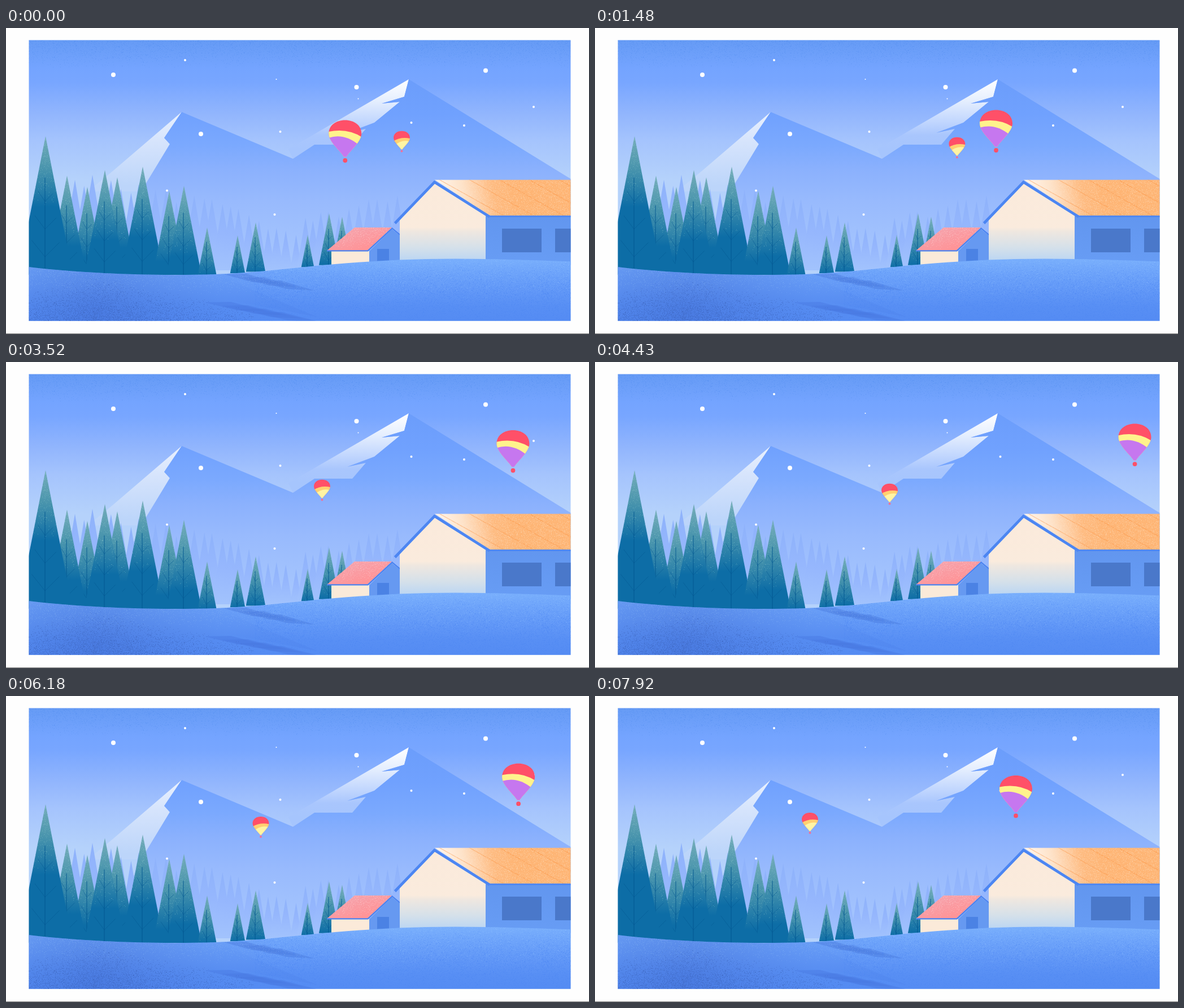
These frames come from a looping animation (1032 by 543 pixels, 8 s). An HTML page with a canvas:

```html
<!DOCTYPE html>
<html lang="en">
<head>
<meta charset="utf-8">
<title>Balloons over the valley</title>
<style>
html, body { margin: 0; width: 100%; height: 100%; overflow: hidden; background: #fefefe; }
canvas { display: block; }
</style>
</head>
<body>
<canvas id="stage" width="1032" height="543"></canvas>
<script>
const W = 1032, H = 543, LOOP = 8000;
const view = document.getElementById('stage').getContext('2d');
const backdrop = document.createElement('canvas');
backdrop.width = W;
backdrop.height = H;
const g = backdrop.getContext('2d');

let seed = 7;
const rnd = () => (seed = (seed * 16807) % 2147483647) / 2147483647;

// Stops are given as position, colour, position, colour ...
function grad(x0, y0, x1, y1, ...stops) {
  const fill = g.createLinearGradient(x0, y0, x1, y1);
  for (let i = 0; i < stops.length; i += 2) fill.addColorStop(stops[i], stops[i + 1]);
  return fill;
}
function glow(x, y, r, inner, outer) {
  const fill = g.createRadialGradient(x, y, 0, x, y, r);
  fill.addColorStop(0, inner);
  fill.addColorStop(1, outer);
  return fill;
}
function shape(d, fill) {
  const path = new Path2D(d);
  g.fillStyle = fill;
  g.fill(path);
  return path;
}
function line(d, color, width) {
  g.strokeStyle = color;
  g.lineWidth = width;
  g.stroke(new Path2D(d));
}
function dot(c, x, y, r, color) {
  c.fillStyle = color;
  c.beginPath();
  c.arc(x, y, r, 0, 7);
  c.fill();
}
// Grain inside a path; keep(u, v) is the chance of a speck at that spot.
function grain(path, x, y, w, h, count, color, keep = () => 1) {
  g.save();
  g.clip(path);
  g.fillStyle = color;
  for (let i = 0; i < count; i++) {
    const u = rnd(), v = rnd();
    if (rnd() < keep(u, v)) g.fillRect(Math.floor(x + u * w), Math.floor(y + v * h), 1, 1);
  }
  g.restore();
}
const fadeDown = (u, v) => 1 - v;

function sky() {
  const path = shape('M40 21H1000V520H40Z', grad(0, 22, 0, 270,
    0, '#669bf5', .2, '#74a4ff', .3, '#78a6ff', .52, '#91b5fd', .72, '#a5c4fd', 1, '#b5d2fb'));
  grain(path, 40, 22, 960, 50, 9000, 'rgba(70,130,235,.25)', fadeDown);
}

function mountains() {
  shape('M713 91L705 122L665 134L697 131L652 168L604 186L637 179L613 206H546L508 232L500 215Z',
    grad(0, 91, 0, 215, 0, '#fff', .3, '#e6effe', .6, '#c2d7fe', .8, '#a9c6fd', 1, '#a6c5fd'));
  shape('M311 149L280 195L290 206L240 290H145L190 253Z',
    grad(0, 149, 0, 280, 0, '#e9f1fe', .4, '#d6e4fc', 1, '#bcd5fa'));
  shape('M713 91L1000 268V430H170L250 272L290 206L280 195L311 149L508 232L546 207H613' +
    'L637 179L604 186L652 168L697 131L665 134L705 122Z',
    grad(0, 91, 0, 400, 0, '#6b9dfb', .2, '#70a1fe', .38, '#7ba9fe', .52, '#8bb1fd',
      .7, '#98bafd', 1, '#a5c5fd'));
}

// The far forest sinks towards the middle of the valley.
function backTrees() {
  for (let x = 122; x < 700; x += 13 + rnd() * 6) {
    const y = 380 - 5.8 * Math.sqrt(Math.abs(x - 500)) + rnd() * 24 - 12;
    const half = (430 - y) * .17;
    shape(`M${x} ${y}L${x + half} 430H${x - half}Z`,
      grad(0, y, 0, 430, 0, '#8eb2fb', .45, '#96b7fd', 1, '#a2c3fd'));
  }
}

function tree(x, top, base) {
  const h = base - top, half = h * .197, fade = Math.min(h, 125);
  const path = shape(`M${x} ${top}L${x + half} ${base}H${x - half}Z`,
    grad(0, top, 0, top + fade, 0, '#76adba', .45, '#4a95ad', 1, '#0d6da6'));
  grain(path, x - half, top, 2 * half, fade, fade * half / 4, 'rgba(150,205,205,.35)', fadeDown);
  line(`M${x - 1} ${top + h * .3}V${base}`, 'rgba(3,86,143,.6)', 1.5);
  for (let k = .45; k < .95; k += .2) {
    const y = top + h * k, reach = half * k * .6;
    line(`M${x - reach} ${y - reach}L${x - 1} ${y + 5}L${x + reach} ${y - reach + 4}`,
      'rgba(3,86,143,.5)', 1);
  }
}

function trees() {
  const tips = [[144, 282], [108, 262], [70, 192], [197, 265], [175, 252], [242, 246], [289, 289],
    [315, 280], [356, 354], [410, 368], [442, 345], [534, 367], [595, 335], [572, 329]];
  for (const [x, y] of tips) tree(x, y, x < 380 ? 438 : 438 - (x - 380) * .09);
}

function barn() {
  shape('M576 396H644V422H576Z', '#fbead9');
  shape('M643 396L683 357L697 368V418H643Z', '#6699f1');
  shape('M657 392H678V418H657Z', '#4b82e4');
  const roof = shape('M568 395L617 354H683L640 395Z', grad(610, 354, 625, 395, 0, '#f5a2ac', 1, '#ff9497'));
  grain(roof, 568, 354, 115, 41, 1500, 'rgba(255,215,215,.3)', fadeDown);
  line('M568 395.3H640.5L683.5 355.5L698 367.5', '#4a83f0', 2.2);
}

function house() {
  shape('M849 334H1000V420H849Z', grad(0, 334, 0, 412, 0, '#6296ef', 1, '#679cf4'));
  shape('M878 356H948V398H878ZM972 356H1000V398H972Z', '#4a78ca');
  shape('M697 338L759 274L849 333V420H697Z',
    grad(0, 274, 0, 411, 0, '#fbeadb', .58, '#faebdd', .64, '#eee7e0', .85, '#d4e0ea', 1, '#bdd6f2'));
  const roof = shape('M759 269.5H1000V333.5H857Z',
    grad(775, 310, 900, 285, 0, '#fff4ea', .3, '#fee2c8', .7, '#febb81', 1, '#feb575'));
  g.save();
  g.clip(roof);
  for (let x = 765; x < 1000; x += 53) line(`M${x} 268L${x + 120} 335`, 'rgba(249,146,67,.45)', 1.3);
  g.restore();
  grain(roof, 759, 270, 241, 63, 4000, 'rgba(255,235,210,.25)');
  line('M688.5 346.5L758.5 273.5L856 335', '#4c86f2', 4.8);
  shape('M853 332.8H1000V335.6H853Z', '#4c86f2');
}

function shadows(x, y, count, length, color) {
  for (let i = 0; i < count; i++, x += 30, y += 6)
    shape(`M${x} ${y}L${x + length * .4} ${y - 1}L${x + length} ${y + 17}L${x + length * .5} ${y + 14}Z`, color);
}

function hills() {
  const path = shape('M40 424C120 434 250 441 371 437C450 434 520 424 600 417.5S760 408 850 410' +
    'S960 413 1000 414.5V520H40Z',
    grad(0, 410, 0, 515, 0, '#78aefc', .25, '#6da3fa', .55, '#6298f7', .8, '#588ff4', 1, '#558cf3'));
  g.fillStyle = glow(160, 505, 330, 'rgba(62,105,207,.5)', 'rgba(80,130,230,0)');
  g.fill(path);
  shape('M372 438L552 513L380 480Z', grad(372, 0, 552, 0, 0, 'rgba(76,128,233,0)', 1, 'rgba(76,128,233,.35)'));
  shadows(386, 437, 3, 100, 'rgba(79,128,226,.55)');
  shadows(352, 487, 4, 115, 'rgba(70,119,222,.4)');
  grain(path, 40, 440, 400, 80, 13000, 'rgba(58,95,182,.42)',
    (u, v) => v * 1.1 - Math.abs(u - .3) * 1.2);
  grain(path, 40, 424, 400, 50, 4000, 'rgba(140,185,245,.3)', fadeDown);
  grain(path, 440, 410, 560, 110, 18000, 'rgba(70,130,240,.3)', (u, v) => 1 - Math.abs(v - .55) * 2);
  grain(path, 440, 410, 560, 70, 7000, 'rgba(150,200,255,.25)', fadeDown);
}

function stars() {
  const large = [[190, 83], [620.5, 105], [345, 188], [849, 75.5]];
  const small = [[317, 57], [485.5, 184], [717.5, 168], [811, 173], [934, 140], [285, 288.5], [475.5, 331]];
  const tiny = [[478.5, 91], [623.5, 125.5]];
  [tiny, small, large].forEach((group, i) => {
    for (const [x, y] of group) dot(g, x, y, 2 ** i, '#fff');
  });
}

function paintBackdrop() {
  g.fillStyle = '#fefefe';
  g.fillRect(0, 0, W, H);
  g.fillStyle = '#777';
  g.fillRect(0, 542, W, 1);
  g.save();
  g.beginPath();
  g.rect(40.5, 21.5, 959, 498.3);
  g.clip();
  [sky, mountains, backTrees, trees, barn, house, hills, stars].forEach(paint => paint());
  g.restore();
}

const envelope = new Path2D('M-29 24C-29 9-16 0 0 0S29 9 29 24C29 38 9 54 2 65H-2C-9 54-29 38-29 24Z');
const band = new Path2D('M-31 22Q4 14 31 32V70H-31Z');
const skirt = new Path2D('M-31 33Q-2 23 24 45V70H-31Z');

// drop moves the coloured bands down the envelope.
function balloon(x, top, scale, drop, upper, middle, lower, basket) {
  view.save();
  view.translate(x, top);
  view.scale(scale, Math.abs(scale));
  dot(view, 0, 71.5, 3.9, basket);
  view.fillStyle = upper;
  view.fill(envelope);
  view.clip(envelope);
  view.translate(0, drop);
  view.fillStyle = middle;
  view.fill(band);
  view.fillStyle = lower;
  view.fill(skirt);
  view.restore();
}

// Distance covered after u poses: speed up, cruise, slow down.
function glide(u) {
  const speed = 12.5, ease = 10.4, total = 40;
  const ramp = x => Math.max(0, x) ** 2 / (2 * ease);
  return speed * (ramp(u) - ramp(u - ease) - ramp(u - total + ease));
}

function draw(now) {
  // Poses are held, about 7.4 a second; both balloons turn at the same moment.
  const k = Math.floor((now % LOOP + 38) / 134.6);
  const turn = k - 36.4, away = Math.abs(turn);
  view.drawImage(backdrop, 0, 0);
  balloon(700.5 - 5.424 * k, 219.2 - away * (turn < 0 ? 1 : .54), -.5, 5,
    '#ff5068', '#ffd071', '#fff4a3', '#f0709a');
  balloon(962.5 - glide(away), 104 + 1.634 * away, 1, -1,
    '#ff5068', '#fff38c', '#c677ef', '#ff5068');
}

paintBackdrop();
const start = performance.now();
function tick() {
  draw(performance.now() - start);
  requestAnimationFrame(tick);
}
tick();
</script>
</body>
</html>
```
